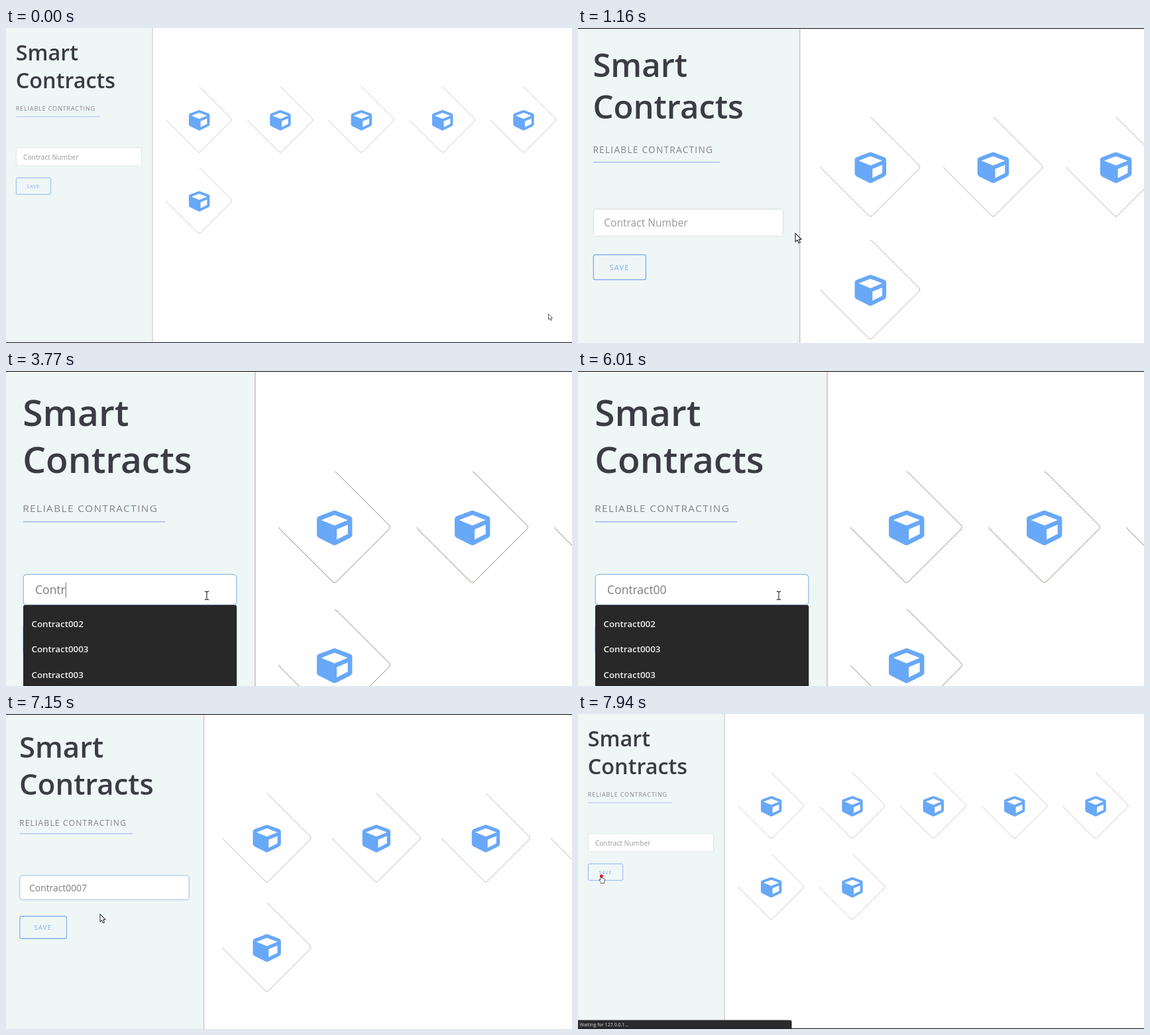
Write an HTML page with a canvas that moves like this. It is 854 px wide and 476 px high and loops after 8 s.

```html
<!DOCTYPE html>
<html lang="en">
<head>
<meta charset="utf-8">
<title>Smart Contracts</title>
<style>
  html, body { margin: 0; width: 100%; height: 100%; overflow: hidden; background: #fff; }
  canvas { display: block; }
</style>
</head>
<body>
<canvas id="stage" width="854" height="476"></canvas>
<script>
const ctx = document.getElementById('stage').getContext('2d');
const LOOP = 8000, ZOOM = 0.7, ZOOM_MS = 900;
const OPEN = 1560, CLOSE = 6500, FILTER = 6140, CLICK = 7880, BAR = 7910, RELOAD = 7940;
const BLUE = '#68a8f8', INK = '#3b3c44';

// Times at which each character of the contract number is typed
const NAME = 'Contract0007';
const KEYS = [2620, 2750, 2950, 3610, 3770, 4300, 4860, 5060, 5320, 5450, 6110, 6470];
const FOCUS = 1850, BLINK = 530;

// Pointer stops: time, x, y in unzoomed page coordinates
const STOPS = [
  [500, 818.5, 432], [1160, 216.7, 204.9], [1370, 186.5, 207], [1820, 186.5, 207],
  [2030, 178.2, 199.6], [6850, 178.2, 199.6], [7420, 43.4, 244.7], [7720, 34.8, 244]
];

const clamp = v => Math.max(0, Math.min(1, v));
const ramp = (t, start) => clamp(Math.floor((t - start) / 30) * 30 / ZOOM_MS);
const zoomAt = t => 1 + ZOOM * (ramp(t, 500) - ramp(t, 6700));

function pointerAt(t) {
  const i = STOPS.findIndex(s => t < s[0]);
  if (i === 0) return STOPS[0].slice(1);
  if (i < 0) return STOPS[STOPS.length - 1].slice(1);
  const [t0, x0, y0] = STOPS[i - 1], [t1, x1, y1] = STOPS[i];
  const u = (t - t0) / (t1 - t0), e = u * u * (3 - 2 * u);
  return [x0 + (x1 - x0) * e, y0 + (y1 - y0) * e];
}

function text(str, x, y, size, color, weight = 400, spacing = 0) {
  ctx.font = `${weight} ${size}px "Open Sans", "Noto Sans", sans-serif`;
  ctx.letterSpacing = spacing + 'px';
  ctx.fillStyle = color;
  ctx.fillText(str, x, y);
}

function rect(x, y, w, h, color) {
  ctx.fillStyle = color;
  ctx.fillRect(x, y, w, h);
}

function box(x, y, w, h, r, fill, stroke, line = 0.7) {
  ctx.beginPath();
  ctx.roundRect(x, y, w, h, r);
  if (fill) { ctx.fillStyle = fill; ctx.fill(); }
  if (stroke) { ctx.strokeStyle = stroke; ctx.lineWidth = line; ctx.stroke(); }
}

function roundPoly(path, pts, r) {
  const n = pts.length, [a, b] = [pts[n - 1], pts[0]];
  path.moveTo((a[0] + b[0]) / 2, (a[1] + b[1]) / 2);
  pts.forEach((p, i) => path.arcTo(...p, ...pts[(i + 1) % n], r));
  path.closePath();
}

const cube = new Path2D();
roundPoly(cube, [[0, -256], [256, -160], [256, 128], [0, 256], [-256, 128], [-256, -160]], 50);
roundPoly(cube, [[0, -188], [192, -115], [0, -36], [-192, -115]], 0);
roundPoly(cube, [[32, 20], [192, -46], [192, 88], [32, 168]], 0);

// Three sides of a rounded diamond; the upper left side stays open
const diamond = new Path2D(
  'M0-49.2Q1-49.2 2-48.2L48.2-2Q50.2 0 48.2 2L2 48.2Q0 50.2-2 48.2L-48.2 2Q-49.2 1-49.2 0');

const arrow = new Path2D('M0 0V8.6L2 6.8L3.4 9.9L4.9 9.2L3.5 6.2H6.1Z');
const hand = new Path2D(
  'M-.9 0Q0-.9.9 0V4Q2 3.3 2.6 4.3Q3.6 3.7 4.2 4.7Q5.6 4.4 5.7 5.8V8Q5.6 9.6 4.8 10.3V11.8H-.2V10.6L-2.9 6.9Q-3.3 5.6-2.1 5.7L-.9 6.8Z');
const beam = new Path2D('M-1.9-3.7Q-.4-3.7 0-3.1Q.4-3.7 1.9-3.7M0-3.1V3.1M-1.9 3.7Q-.4 3.7 0 3.1Q.4 3.7 1.9 3.7');

function contract(i) {
  ctx.save();
  ctx.translate(291.6 + 122.35 * (i % 5), 138.8 + 122.5 * Math.floor(i / 5));
  ctx.strokeStyle = '#b0aca5';
  ctx.lineWidth = 0.62;
  ctx.stroke(diamond);
  ctx.translate(0, 0.7);
  ctx.scale(0.0613, 0.0613);
  ctx.fillStyle = BLUE;
  ctx.fill(cube, 'evenodd');
  ctx.restore();
}

function field(t) {
  const focused = t >= OPEN && t < RELOAD;
  box(15.4, 180.8, 189.2, 27.2, 3, '#fff', focused ? '#8cb8e8' : '#d9dcdd');
  const count = t < RELOAD ? KEYS.filter(k => t >= k).length : 0;
  const typed = NAME.slice(0, count);
  if (count) text(typed, 25.9, 198.5, 10.3, '#7d7b80');
  else text('Contract Number', 25.9, 198.5, 10.3, '#9a9a9e');

  const last = count ? KEYS[count - 1] : FOCUS + 180;
  const lit = t < last || Math.floor((t - last) / BLINK) % 2 === 0;
  if (t >= FOCUS && t < RELOAD && lit) {
    const w = count ? ctx.measureText(typed).width : 0;
    rect(26 + w, 187.8, 0.6, 13.8, '#77777f');
  }
}

function suggestions(t) {
  box(15.3, 208, 189.5, 90, 2, '#282828');
  const rows = t < FILTER
    ? ['Contract002', 'Contract0003', 'Contract003']
    : ['Contract0003', 'Contract0004', 'Contract0005'];
  rows.forEach((row, i) => text(row, 22.6, 227.4 + 22.7 * i, 7.87, '#f0f0f0', 600));
}

function pointer(t) {
  const [x, y] = pointerAt(t);
  const inField = x > 15 && x < 205 && y > 181 && y < 208;
  const onButton = x > 15 && x < 68 && y > 226 && y < 252;
  ctx.save();
  ctx.translate(x, y);
  ctx.lineJoin = 'round';
  if (inField) {
    ctx.strokeStyle = '#333';
    ctx.lineWidth = 0.7;
    ctx.stroke(beam);
  } else {
    const shape = onButton ? hand : arrow;
    ctx.fillStyle = '#fff';
    ctx.fill(shape);
    ctx.strokeStyle = '#333338';
    ctx.lineWidth = 0.8;
    ctx.stroke(shape);
  }
  if (t >= CLICK) {
    ctx.beginPath();
    ctx.arc(0.6, 1, 2.4, 0, 7);
    ctx.fillStyle = '#e0101c';
    ctx.fill();
  }
  ctx.restore();
}

function draw(t) {
  const z = zoomAt(t);
  ctx.setTransform(1, 0, 0, 1, 0, 0);
  rect(0, 0, 854, 476, '#fff');
  ctx.setTransform(z, 0, 0, z, 0, 0);

  rect(0, 0, 221, 476, '#eff6f6');
  rect(220.5, 0, 1.2, 476, '#d3cacd');
  text('Smart', 14.8, 48.9, 32.4, INK, 600);
  text('Contracts', 14.8, 90.6, 32.4, INK, 600);
  text('RELIABLE CONTRACTING', 14.8, 125.1, 9, '#85808a', 400, 0.85);
  rect(15.3, 133.5, 126, 0.95, '#a9bcea');

  const total = t < RELOAD ? 6 : 7;
  for (let i = 0; i < total; i++) contract(i);

  field(t);
  box(15.4, 226.4, 52.3, 25, 2, null, '#76a8ee', 0.8);
  text('SAVE', 31.4, 241.7, 7.2, '#82abef', 400, 0.85);
  if (t >= OPEN && t < CLOSE) suggestions(t);

  rect(0, 475, 854, 1, '#111');
  if (t >= BAR) {
    box(-4, 462.5, 326.5, 13, [0, 3, 0, 0], '#2b2b2e');
    text('Waiting for 127.0.0.1...', 2.6, 471.8, 7.1, '#dcdcdc');
  }
  pointer(t);

  ctx.setTransform(1, 0, 0, 1, 0, 0);
  if (z > 1.3) rect(0, 0, 854, 1, '#000');
}

const begin = performance.now();
function frame() {
  draw((performance.now() - begin) % LOOP);
  requestAnimationFrame(frame);
}
frame();
</script>
</body>
</html>
```
